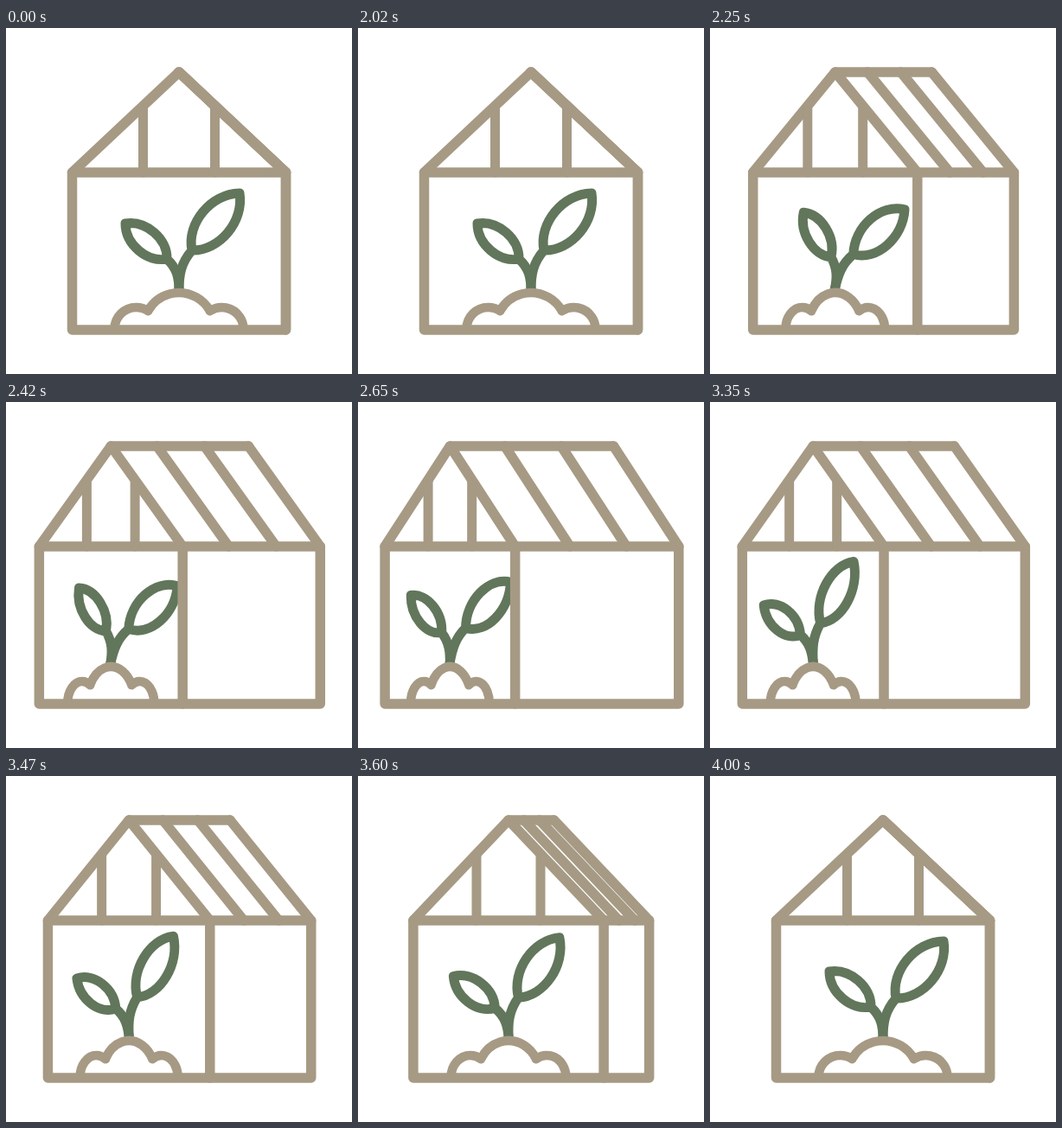
An HTML page with a canvas that plays this animation: 400x400 px, repeating every 4020 ms.

```html
<!DOCTYPE html>
<html lang="en">
<head>
<meta charset="utf-8">
<title>Greenhouse</title>
<style>
html, body { margin: 0; width: 100%; height: 100%; overflow: hidden; background: #fff; }
canvas { display: block; width: 100vw; height: 100vh; }
</style>
</head>
<body>
<canvas id="stage"></canvas>
<script>
const canvas = document.getElementById('stage');
const ctx = canvas.getContext('2d');
const SIZE = 400, LOOP = 4020, OPEN = 2022, CLOSE = 3000;
const WOOD = '#a69a84', LEAF = '#61765b';
const RIDGE = 51, EAVES = 167, FLOOR = 349, WIDTH = 247, MAX_DEPTH = 196;

const ratio = Math.max(1, window.devicePixelRatio || 1);
canvas.width = canvas.height = SIZE * ratio;

const clamp = v => Math.min(1, Math.max(0, v));
const cubicOut = v => 1 - (1 - v) ** 3;
const cubicInOut = v => v < 0.5 ? 4 * v ** 3 : 1 - 4 * (1 - v) ** 3;

function depthAt(t) {
  const open = cubicOut(clamp((t - OPEN) / 935));
  const close = cubicInOut(clamp((t - CLOSE) / 1012));
  return MAX_DEPTH * open * (1 - close);
}

// One swing out and back in degrees, quicker on the way out
const swing = (t, start, span, angle) =>
  angle * Math.sin(Math.PI * clamp((t - start) / span) ** 0.7);

function line(...p) {
  ctx.beginPath();
  for (let i = 0; i < p.length; i += 2) ctx.lineTo(p[i], p[i + 1]);
  ctx.stroke();
}

function pen(color, width) {
  ctx.strokeStyle = color;
  ctx.lineWidth = width;
}

// A stem from the root to (x, y) that ends in a symmetric leaf
function branch(cx, squeeze, degrees, x, y, tipX, tipY) {
  const dx = tipX - x, dy = tipY - y;
  const at = (along, across) =>
    [x + dx * along - dy * across, y + dy * along + dx * across];
  ctx.save();
  ctx.translate(cx, 300);
  ctx.scale(squeeze, 1);
  ctx.rotate(degrees * Math.PI / 180);
  ctx.beginPath();
  ctx.moveTo(0, 4);
  ctx.bezierCurveTo(0, y * 0.35, x * 0.15, y * 0.66, x, y);
  ctx.bezierCurveTo(...at(0.23, -0.29), ...at(0.75, -0.29), tipX, tipY);
  ctx.bezierCurveTo(...at(0.75, 0.29), ...at(0.23, 0.29), x, y);
  ctx.restore();
  ctx.stroke();
}

function drawSprout(cx, squeeze, t) {
  const left = swing(t, OPEN, 680, 14) - swing(t, CLOSE, 850, 7.8);
  const right = swing(t, OPEN, 1050, 15) - swing(t, CLOSE, 850, 5.8);
  pen(LEAF, 11);
  branch(cx, squeeze, left, -14, -33, -62, -74);
  branch(cx, squeeze, right, 15, -43, 70, -109);
}

function drawSoil(cx, scale) {
  const bump = (x, y, r, from, to) =>
    ctx.ellipse(cx + x * scale, y, r * scale, r, 0, from, to);
  const small = Math.atan2(21, 14), big = Math.atan2(20, 35.5);
  pen(WOOD, 10.5);
  ctx.beginPath();
  bump(-49.5, 348, 25, Math.PI, 2 * Math.PI - small);
  bump(0, 347, 41, Math.PI + big, 2 * Math.PI - big);
  bump(49.5, 348, 25, Math.PI + small, 2 * Math.PI);
  ctx.stroke();
}

function drawHouse(left, front, depth) {
  const cx = left + front / 2, mid = left + front, right = mid + depth;
  pen(WOOD, 11.5);
  for (const part of [0.335, 0.68, 1]) {
    line(cx + depth * part, RIDGE, mid + depth * part, EAVES);
  }
  line(cx, RIDGE, cx + depth, RIDGE);
  line(left, EAVES, cx, RIDGE, mid, EAVES);
  line(left, EAVES, right, EAVES, right, FLOOR, left, FLOOR, left, EAVES);
  line(mid, EAVES, mid, FLOOR);
  pen(WOOD, 11);
  for (const side of [-1, 1]) {
    const x = cx + side * front * 0.168;
    line(x, 92, x, EAVES);
  }
}

function draw(t) {
  const depth = depthAt(t);
  const front = WIDTH - 0.51 * depth;
  const left = 200 + 0.005 * depth - (front + depth) / 2;
  const cx = left + front / 2, scale = front / WIDTH;

  ctx.setTransform(ratio, 0, 0, ratio, 0, 0);
  ctx.fillStyle = '#fff';
  ctx.fillRect(0, 0, SIZE, SIZE);
  ctx.lineCap = ctx.lineJoin = 'round';
  drawSprout(cx, 1 - 0.6 * (1 - scale), t);
  drawSoil(cx, scale);
  drawHouse(left, front, depth);
}

const start = performance.now();
function tick() {
  draw((performance.now() - start) % LOOP);
  requestAnimationFrame(tick);
}
tick();
</script>
</body>
</html>
```
